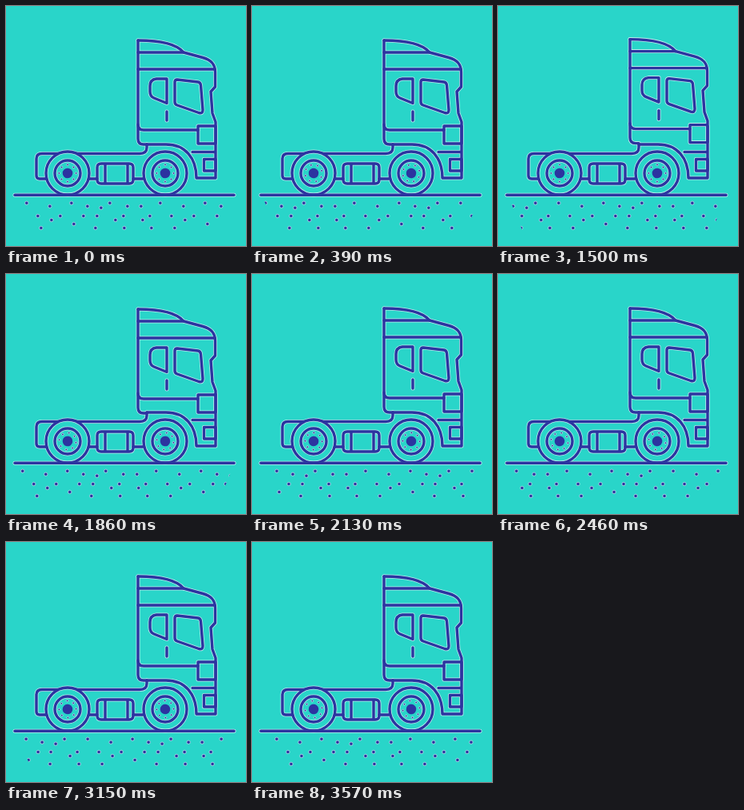
Animation, 300 px wide and 300 px high, one loop 3.6 s. Source, as an HTML page:

```html
<!DOCTYPE html>
<html lang="en">
<head>
<meta charset="utf-8">
<title>Truck</title>
<style>
  html, body { margin: 0; width: 100%; height: 100%; overflow: hidden; background: #29d5c9; }
  svg { display: block; width: 100vw; height: 100vh; }
  .line, .halo { fill: none; stroke-linecap: round; stroke-linejoin: round; }
  .line { stroke: #2c34a0; stroke-width: 3.4; }
  .halo { stroke: #e6f5f7; stroke-width: 5; opacity: .75; }
  .solid { fill: #2c34a0; }
  .speck { fill: #2c34a0; stroke: #e6f5f7; stroke-opacity: .75; stroke-width: .8; }
</style>
</head>
<body>
<svg viewBox="0 0 300 300">
  <defs>
    <clipPath id="road"><path d="M13 238H285L267 282H31Z"/></clipPath>
    <g id="base">
      <path d="M50 216H42Q38 216 38 212V191Q38 184.500 45 184.500H65M89 184.500H167Q176 184.500 176 177V173"/>
      <path d="M176 173H200C224 173 238 190 238 215H262V150M233 182.500H262"/>
      <path d="M247.500 191.500H262V206H247.500Z"/>
      <path d="M104 216H114M159 216H171"/>
      <path d="M119 197H154Q159 197 159 202V217Q159 222 154 222H119Q114 222 114 217V202Q114 197 119 197ZM124 197V222M152 197V222"/>
      <path d="M11 236.300H285"/>
      <circle cx="77" cy="209" r="27"/><circle cx="77" cy="209" r="16"/>
      <circle cx="199" cy="209" r="27"/><circle cx="199" cy="209" r="16"/>
    </g>
    <g id="cab">
      <path d="M165 43V166Q165 173 172 173H176"/>
      <path d="M165 148Q165 155 172 155H240"/>
      <path d="M165 43C190 43 212 46 222 58"/>
      <path d="M165 58H222L246 64.500C257 67.500 261.500 73 261.500 83V101L256 107L258 134L262 145V172H240V150H262"/>
      <path d="M165 79H261"/>
      <path d="M201 91H188Q180 92 180 100V107Q180 113 185 115L201 121.500Z"/>
      <path d="M214 92L240 95Q243 95.500 243.500 99L246 130Q246 135 241 133.500L214 124Q211 123 211 120V95Q211 92 214 92Z"/>
      <path d="M201 132V143"/>
    </g>
  </defs>
  <use href="#base" class="halo"/>
  <use href="#cab" class="halo bob"/>
  <use href="#base" class="line"/>
  <use href="#cab" class="line bob"/>
  <g id="wheels"></g>
  <g clip-path="url(#road)"><g id="specks"></g></g>
</svg>
<script>
  const LOOP = 3600;
  const TILE = 300;

  // Road specks: row height, then positions inside one tile
  const rows = [
    [246.3, 26, 82, 130, 193, 249, 297],
    [250.3, 55, 102, 152, 169, 222, 269],
    [252.3, 119, 286],
    [262.5, 13, 40, 68, 97, 114, 147, 180, 207, 235, 264, 280],
    [267.5, 4, 57, 137, 171, 224],
    [272.5, 85, 252],
    [277.5, 15, 44, 112, 148, 182, 211, 279]
  ];
  // Cab bounce: time, vertical offset
  const bounce = [[0, 0], [1200, 0], [1560, -1.5], [1860, 1], [2100, 0], [LOOP, 0]];

  const $ = id => document.getElementById(id);
  const add = (parent, name, attrs) => {
    const el = document.createElementNS("http://www.w3.org/2000/svg", name);
    for (const key in attrs) el.setAttribute(key, attrs[key]);
    return parent.appendChild(el);
  };

  for (const [y, ...xs] of rows)
    for (const x of xs)
      for (const cx of [x, x + TILE])
        add($("specks"), "circle", { cx, cy: y, r: 2.2, class: "speck" });

  const wheels = [77, 199].map(x => {
    const hub = add($("wheels"), "g", {});
    add(hub, "circle", { r: 6.3, class: "solid" });
    for (let i = 0; i < 8; i++) {
      const a = i * Math.PI / 4;
      add(hub, "circle", { cx: 10.6 * Math.cos(a), cy: 10.6 * Math.sin(a), r: 1.3, class: "speck" });
    }
    return { hub, x };
  });
  const cabs = document.querySelectorAll(".bob");

  function cabOffset(t) {
    const i = bounce.findIndex(([end]) => t < end);
    const [t0, y0] = bounce[i - 1], [t1, y1] = bounce[i];
    const k = (t - t0) / (t1 - t0);
    return y0 + (y1 - y0) * k * k * (3 - 2 * k);
  }

  // The road passes twice per loop, with a short rest between
  const roadPass = t => t < 1830 ? Math.min(t / 1800, 1) : (t - 1830) / 1770;

  function draw(t) {
    const pass = roadPass(t);
    $("specks").setAttribute("transform", `translate(${-pass * TILE} 0)`);
    for (const { hub, x } of wheels)
      hub.setAttribute("transform", `translate(${x} 209) rotate(${pass * 540})`);
    for (const cab of cabs) cab.setAttribute("transform", `translate(0 ${cabOffset(t)})`);
  }

  const start = performance.now();
  function tick() {
    draw((performance.now() - start) % LOOP);
    requestAnimationFrame(tick);
  }
  tick();
</script>
</body>
</html>
```
